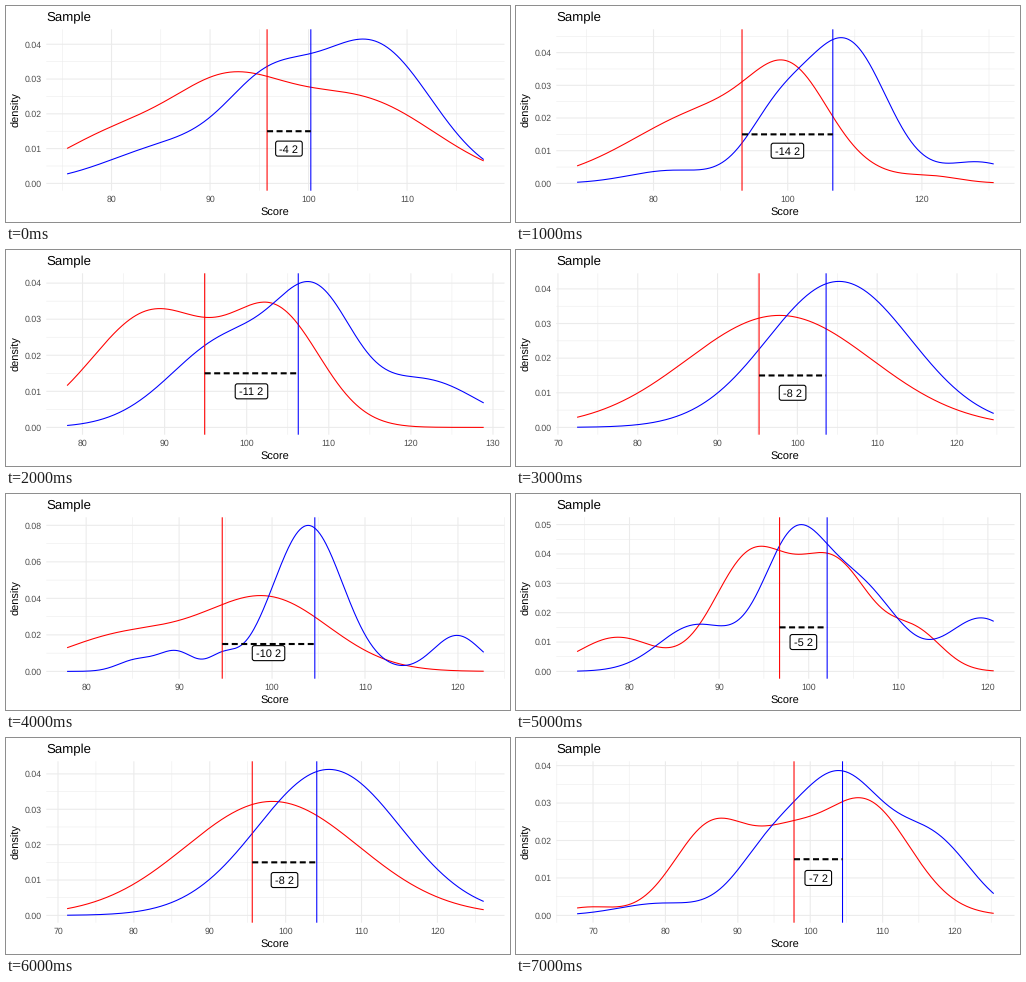
A matplotlib script that plays this animation: 504x216 px, repeating every 8 s.

```python
import numpy as np
import matplotlib.pyplot as plt
from matplotlib.animation import FuncAnimation
from matplotlib.patches import FancyBboxPatch

W, H, DPI = 504, 216, 72
LEFT, RIGHT, TOP, BOTTOM = 40.3, 498.5, 23.3, 184.7
X0, X1, ZERO, PEAK_H = 61.1, 477.7, 177.4, 146.8
SPAN = 14  # bump positions run from 0 to SPAN over the score range

plt.rcParams.update({
    "font.family": "Liberation Sans",
    "text.hinting": "none",
    "path.snap": False,
})

samples = []


def add(xlim, peak, means, steps, red, blue):
    """Curves are sums of bumps: centre, width, height in pixels."""
    samples.append((xlim, peak, means, steps, red, blue))


add((75.49, 117.78), .0422, (95.79, 100.23), (10, .01),
    [(1.6, 2, 46), (5.3, 1.87, 81), (9.7, 2.65, 84)],
    [(3.7, 2.2, 39), (6.7, 1.4, 70), (10.2, 2.02, 140)])
add((68.61, 130.7), .0449, (93.19, 106.72), (20, .01),
    [(4.8, 2.8, 76), (7.2, 1.25, 68), (12, .9, 5)],
    [(3.2, 1.45, 13), (6.7, 1.05, 59), (9.05, 1.35, 140), (13.5, 1.2, 21)])
add((78.12, 128.87), .0407, (94.88, 106.28), (10, .01),
    [(2.9, 2.03, 116), (7.05, 1.5, 108)],
    [(5.55, 2, 90), (8.4, 1.25, 105), (12, 1.75, 47)])
add((72.4, 124.6), .0424, (95.2, 103.6), (10, .01),
    [(6.8, 3.1, 112)],
    [(8.8, 2.4, 146)])
add((77.95, 122.77), .0804, (94.64, 104.6), (10, .02),
    [(1.9, 2.1, 35), (6.7, 2.1, 73)],
    [(2.3, .6, 11), (3.65, .6, 20), (5.2, .45, 13), (8.1, 1.15, 146),
     (13.1, .8, 36)])
add((74.15, 120.65), .05, (96.75, 102.06), (10, .01),
    [(1.35, 1.3, 34), (5.85, 1.25, 114), (8.65, 1.25, 106), (11.4, .9, 36)],
    [(4, 1.25, 46), (7.25, 1.05, 122), (9.45, 1.3, 84), (13.6, 1.15, 53)])
add((71.2, 126.1), .0415, (95.6, 104.1), (10, .01),
    [(6.9, 2.9, 114)],
    [(8.8, 2.4, 146)])
add((67.8, 125.34), .0392, (97.76, 104.46), (10, .01),
    [(.4, .9, 8), (4.6, 1.3, 92), (7, 1.05, 48), (9.6, 1.55, 115)],
    [(2.8, 1.4, 12), (6.3, 1.1, 46), (8.8, 1.5, 138), (12, 1.3, 70)])

fig = plt.figure(figsize=(W / DPI, H / DPI), dpi=DPI, facecolor="white")
ax = fig.add_axes([0, 0, 1, 1])


def line(xs, ys, color, lw=1.07, **kw):
    ax.plot(xs, ys, color=color, lw=lw, solid_capstyle="butt",
            dash_capstyle="butt", **kw)


def curve(bumps, color):
    t = np.linspace(0, SPAN, 400)
    h = sum(a * np.exp(-((t - c) / s) ** 2 / 2) for c, s, a in bumps)
    line(X0 + t * (X1 - X0) / SPAN, ZERO - h, color)


def text(x, y, s, size, color="black", ha="center", va="baseline", **kw):
    ax.text(x, y, s, size=size, color=color, ha=ha, va=va, **kw)


def ticks(lo, hi, step):
    """Multiples of half a step inside the range, flagged when major."""
    half = step / 2
    for k in range(int(np.ceil(lo / half)), int(np.floor(hi / half)) + 1):
        yield k * half, k % 2 == 0


def draw(i):
    (lo, hi), peak, means, (xstep, ystep), red, blue = samples[i]

    def px(x):
        return X0 + (x - lo) * (X1 - X0) / (hi - lo)

    def py(d):
        return ZERO - d * PEAK_H / peak

    ax.clear()
    ax.set(xlim=(0, W), ylim=(H, 0))
    ax.axis("off")

    # grid and tick labels
    margin = (hi - lo) * .05
    for x, major in ticks(lo - margin, hi + margin, xstep):
        line([px(x)] * 2, [TOP, BOTTOM], "#ebebeb", 1.07 if major else .53)
        if major:
            text(px(x), 196.2, f"{x:.0f}", 8.8, "#4d4d4d")
    for d, major in ticks(0, peak * 1.05, ystep):
        line([LEFT, RIGHT], [py(d)] * 2, "#ebebeb", 1.07 if major else .53)
        if major:
            text(35.3, py(d) + 3.2, f"{d:.2f}", 8.8, "#4d4d4d", "right")

    # densities and means
    curve(red, "red")
    curve(blue, "blue")
    m1, m2 = px(means[0]), px(means[1])
    line([m1, m1], [TOP, BOTTOM], "red")
    line([m2, m2], [TOP, BOTTOM], "blue")
    line([m1, m2], [py(.015)] * 2, "black", 2.1,
         linestyle=(0, (6 / 2.1, 3.5 / 2.1)))

    # difference label
    label = f"{means[0] - means[1]:.0f} 2"
    cx, cy = (m1 + m2) / 2, py(.01)
    w, h = 5.9 * len(label) + 3, 15
    ax.add_patch(FancyBboxPatch(
        (cx - w / 2, cy - h / 2), w, h,
        boxstyle="round,pad=0,rounding_size=2.2",
        fc="white", ec="black", lw=1.1, zorder=3))
    text(cx, cy + 4, label, 11, zorder=4)

    # titles
    text(40, 15, "Sample", 13.2, ha="left")
    text(269.3, 209, "Score", 11)
    text(10, 104, "density", 11, rotation=90, va="center")
    return []


anim = FuncAnimation(fig, draw, frames=len(samples), interval=1000,
                     init_func=lambda: [], repeat=True, repeat_delay=0,
                     blit=False)
plt.show()
```
